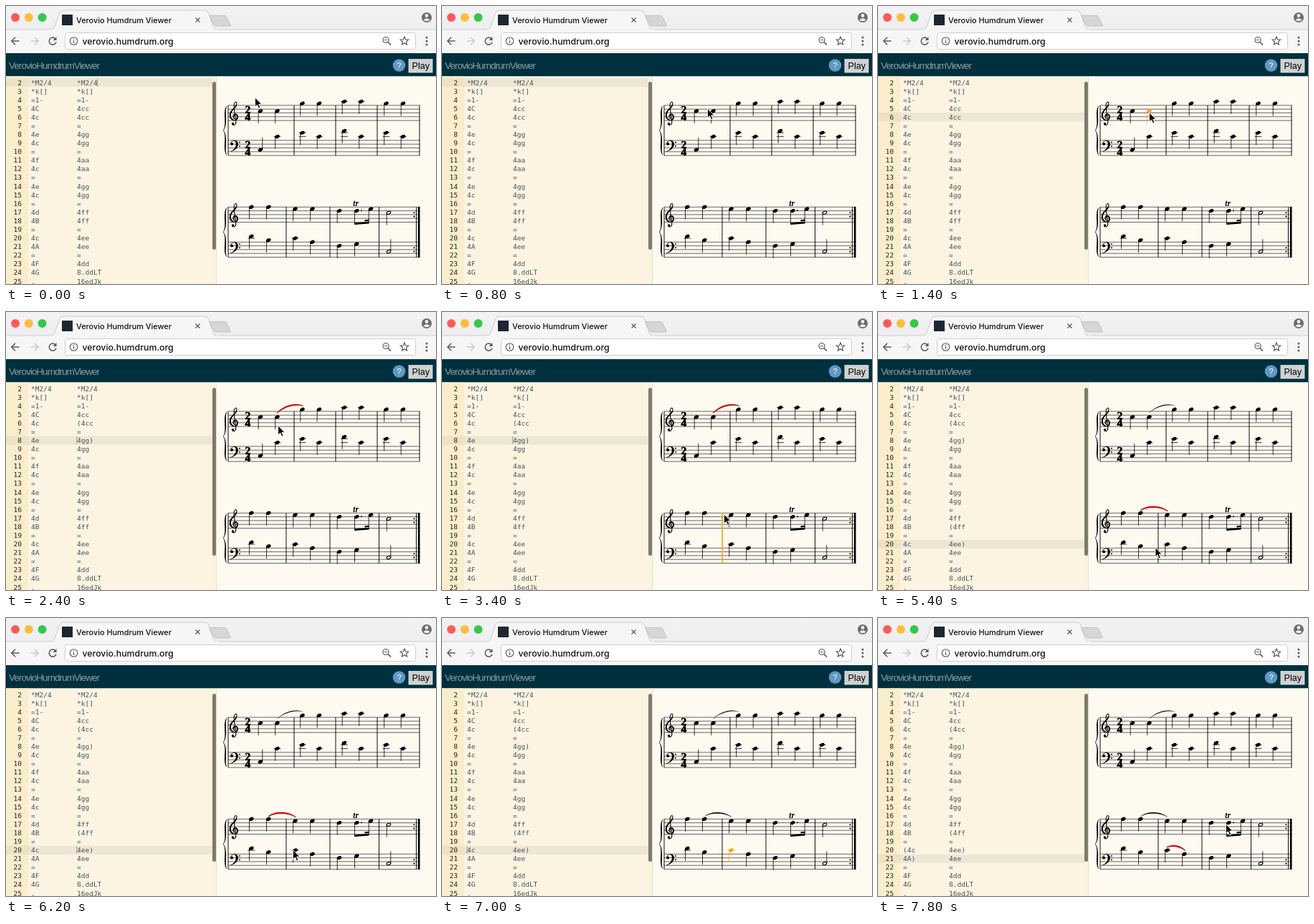
Animation, 600 px wide and 389 px high, one loop 8000 ms. Source, as an HTML page:

```html
<!DOCTYPE html>
<html lang="en">
<head>
<meta charset="utf-8">
<title>Verovio Humdrum Viewer</title>
<style>
html, body { margin: 0; width: 100%; height: 100%; overflow: hidden; background: #fffaf0; }
svg { display: block; width: 100vw; height: 100vh; }
.ui { font-family: Inter, Roboto, sans-serif; font-weight: 500; }
.arial { font-family: "Liberation Sans", Arial, sans-serif; }
.code { font: 9.5px "DejaVu Sans Mono", Menlo, monospace; white-space: pre; }
.serif { font-family: "Liberation Serif", "Times New Roman", serif; font-weight: bold; }
</style>
</head>
<body>
<svg id="stage" viewBox="0 0 600 389">
  <defs>
    <linearGradient id="strip" x2="0" y2="1"><stop stop-color="#f2f1f3"/><stop offset="1" stop-color="#eeedef"/></linearGradient>
  </defs>
  <g id="browser">
    <rect width="600" height="34" fill="url(#strip)"/>
    <rect y="33" width="600" height="34" fill="#f7f6f7"/>
    <path d="M0 33H64M296 33H600" stroke="#c4c2c5" stroke-width=".8"/>
    <path d="M62 33.5C67 33 67.500 30 69 26L74.500 10Q76 6 80 6H277Q281 6 282.500 10L288 26C289.500 30 290 33 295 33.500Z" fill="#f7f6f7" stroke="#c0bec1" stroke-width=".8"/>
    <path d="M62 33H295V36H62Z" fill="#f7f6f7"/>
    <path d="M285 13.500H305Q307 13.500 308 16L313 26Q314 28 311 28H293Q291 28 290 26L284.500 15.500Q284 13.500 285 13.500Z" fill="#d6d5d7" stroke="#b8b6b9" stroke-width=".8"/>
    <circle cx="13" cy="16" r="6" fill="#fc5b57"/>
    <circle cx="31.800" cy="16" r="6" fill="#fdbd3e"/>
    <circle cx="50.500" cy="16" r="6" fill="#34c84a"/>
    <rect x="78" y="12" width="15" height="15" fill="#1d2733"/>
    <text class="ui" x="98" y="23.500" font-size="10.900" fill="#111">Verovio Humdrum Viewer</text>
    <path d="M264.500 16.500L270.500 22.500M270.500 16.500L264.500 22.500" stroke="#555" stroke-width="1.200"/>
    <g fill="#6b6a6c">
      <circle cx="587" cy="16" r="7"/>
      <circle cx="587" cy="13.500" r="2.400" fill="#f0eff1"/>
      <path d="M582.300 19.500Q587 15.200 591.700 19.500Q587 23 582.300 19.500Z" fill="#f0eff1"/>
    </g>
    <g fill="none" stroke="#5a5a5c" stroke-width="1.600">
      <path d="M18.500 49H8M13 43.800L7.800 49L13 54.200"/>
      <path d="M34.500 49H45M40 43.800L45.200 49L40 54.200" stroke="#cbcacc"/>
      <path d="M69.300 46.200A5 5 0 1 0 70 50.500"/>
      <path d="M70.500 43V48H65.500Z" fill="#5a5a5c" stroke="none"/>
    </g>
    <rect x="82.500" y="37.500" width="489" height="23" rx="3" fill="#fff" stroke="#cfced0"/>
    <circle cx="94.500" cy="49" r="5.300" fill="none" stroke="#555" stroke-width="1.100"/>
    <path d="M94.500 48V52M94.500 45.500V46.800" stroke="#555" stroke-width="1.200"/>
    <text class="ui" x="106.500" y="53.500" font-size="12.350" fill="#111">verovio.humdrum.org</text>
    <g fill="none" stroke="#555" stroke-width="1.200">
      <circle cx="530" cy="47.500" r="4"/>
      <path d="M533 50.500L537 54.500" stroke-width="1.700"/>
      <path d="M528 47.500H532" stroke-width=".9"/>
      <path id="star"/>
    </g>
    <g fill="#5a5a5c"><circle cx="587" cy="44" r="1.500"/><circle cx="587" cy="49" r="1.500"/><circle cx="587" cy="54" r="1.500"/></g>
  </g>
  <g id="header">
    <rect y="66" width="600" height="32.500" fill="#00303e"/>
    <text class="arial" x="4" y="88" font-size="13.500" letter-spacing="-.96" fill="#8b9ca2">VerovioHumdrumViewer</text>
    <circle cx="548.500" cy="83" r="8.800" fill="#6098c6"/>
    <text class="arial" x="548.500" y="87" font-size="11.500" text-anchor="middle" fill="#fff">?</text>
    <rect x="562" y="74.500" width="33" height="18.500" fill="#d0d0d0" stroke="#e6e6e6" stroke-width=".8"/>
    <text class="arial" x="566.500" y="88" font-size="12.600" fill="#000">Play</text>
  </g>
  <rect y="98.500" width="294" height="291" fill="#fdf3e1"/>
  <rect y="98.500" width="31" height="291" fill="#faedcc"/>
  <g id="line"><rect y="-6" width="288" height="12.100" fill="#eee6d4"/><rect y="-6" width="31" height="12.100" fill="#ede3c3"/></g>
  <g id="rows" class="code"></g>
  <rect id="caret" width=".6" height="11" fill="#666"/>
  <rect x="293" y="98.500" width="307" height="291" fill="#fffaf0"/>
  <path d="M293.500 98.500V389" stroke="#ddd6c8" stroke-width=".8"/>
  <rect x="288" y="106" width="5" height="235" rx="2.500" fill="#807a6c"/>
  <g id="score"></g>
  <path id="mouse" d="M0 0V13L3 10.300L5.200 15.300L7.400 14.300L5.200 9.500H9.300Z" fill="#000" stroke="#fff" stroke-width=".9" stroke-linejoin="round"/>
</svg>
<script>
const $ = id => document.getElementById(id);
const score = $('score');
const SP = 5.3, GAP = 49, ORANGE = '#f9a51b', RED = '#d40f14', LOOP = 8000, STEP = 200;

function add(parent, tag, attrs, text) {
  const el = document.createElementNS('http://www.w3.org/2000/svg', tag);
  for (const k in attrs) el.setAttribute(k, attrs[k]);
  if (text !== undefined) el.textContent = text;
  parent.appendChild(el);
  return el;
}
const rule = (d, width, parent = score) =>
  add(parent, 'path', { d, fill: 'none', stroke: 'currentColor', 'stroke-width': width });
const shape = (d, parent = score) => add(parent, 'path', { d, fill: 'currentColor' });
const dot = (cx, cy, r) => add(score, 'circle', { cx, cy, r, fill: 'currentColor' });
const show = (el, on) => el.setAttribute('visibility', on ? 'visible' : 'hidden');

// Toolbar star
$('star').setAttribute('d', 'M' + Array.from({ length: 10 }, (_, i) => {
  const r = i % 2 ? 2.7 : 6, a = i * Math.PI / 5;
  return [556 + r * Math.sin(a), 49 - r * Math.cos(a)].map(v => v.toFixed(1));
}).join('L') + 'Z');

// Editor
const source = `*M2/4 *M2/4|*k[] *k[]|=1- =1-|4C 4cc|4c 4cc|= =|4e 4gg|4c 4gg|= =|4f 4aa|4c 4aa|= =
4e 4gg|4c 4gg|= =|4d 4ff|4B 4ff|= =|4c 4ee|4A 4ee|= =|4F 4dd|4G 8.ddLT|. 16edJk`
  .split(/[|\n]/).map(row => row.split(' '));
const rowY = n => 107 + 12.09 * (n - 2);
const cells = source.map((row, i) => {
  const y = rowY(i + 2) + 3.5;
  add($('rows'), 'text', { x: 22, y, 'text-anchor': 'end', fill: '#222' }, i + 2);
  return [35, 99].map((x, c) => add($('rows'), 'text', { x, y, fill: '#44555b' }, row[c]));
});

// Score: step counts half spaces below the top staff line
function note(x, top, step, up, half, len = 17.3) {
  const y = top + step * SP / 2, g = add(score, 'g', {});
  for (let s = -2; s >= step; s -= 2) rule(`M${x - 4.9} ${top + s * SP / 2}h9.800`, .8, g);
  add(g, 'ellipse', {
    cx: x, cy: y, rx: half ? 2.9 : 3.4, ry: half ? 1.9 : 2.4, transform: `rotate(-24 ${x} ${y})`,
    fill: half ? 'none' : 'currentColor', stroke: half ? 'currentColor' : 'none', 'stroke-width': 1.1
  });
  const sx = x + (up ? 2.8 : -2.8);
  rule(`M${sx} ${y}v${up ? -len : len}`, .8, g);
  return g;
}

function system(top, bars) {
  const low = top + GAP, end = low + 4 * SP;
  for (const y of [top, low])
    for (let i = 0; i < 5; i++) rule(`M310 ${y + i * SP}H577.500`, .6);
  const lines = [310, ...bars].map(x => rule(`M${x} ${top}V${end}`, .95));
  const h = end - top;
  const brace = shape(`M308.500 0C301 7 309 26 303 ${h / 2}C309 ${h - 26} 301 ${h - 7} 308.500 ${h}
    C304 ${h - 9} 310.800 ${h - 24} 303.700 ${h / 2}C310.800 24 304 9 308.500 0Z`);
  brace.setAttribute('transform', `translate(0 ${top})`);

  const treble = add(score, 'g', { transform: `translate(318.700 ${top + 3 * SP})` });
  rule(`M.8 2.800C-2.600 2 -2.600 -3.200 1 -3.600C5.500 -4 6.200 4.400 .6 4.900C-7.500 5 -8 -4 -3.400 -9
    C0 -12.500 3.600 -14.500 3.200 -18.500C2.800 -22 .6 -21 -.4 -17.500C-1.200 -14 .6 -5 2 6C2.800 11.300 -1 13 -3 10.800`, 1.1, treble);
  rule('M-1.500 4.300C-7 2.500 -6.800 -4.500 -3 -9C-.8 -11.300 2 -13.500 2.800 -16.500', 1.6, treble);
  rule('M-.8 -.8C-.6 -2.800 .6 -3.600 2 -3.200C5 -2.200 4.600 2.500 2.500 4', 1.5, treble);
  add(treble, 'circle', { cx: -2.2, cy: 9.8, r: 1.7, fill: 'currentColor' });

  const bass = add(score, 'g', { transform: `translate(319.300 ${low + SP})` });
  shape(`M-6.200 0C-5.800 -3.500 -3 -5.300 -.5 -5.300C3 -5.300 4.600 -2.800 4.600 0C4.600 5.500 0 8.800 -6.300 10.800
    L-6.500 10.300C-1.500 8 1.500 5 1.500 0C1.500 -2.800 .5 -4.500 -1.200 -4.500C-3 -4.500 -4.800 -3 -5 -1.500Z`, bass);
  for (const [cx, cy, r] of [[-4.2, -.2, 2], [6.7, -2.6, 1], [6.7, 2.6, 1]])
    add(bass, 'circle', { cx, cy, r, fill: 'currentColor' });
  return lines;
}

const TOP = 139, TOP2 = 281.3, LOW = TOP + GAP, LOW2 = TOP2 + GAP;
score.setAttribute('color', '#000');
system(TOP, [402, 460, 518, 577]);
const bar = system(TOP2, [391, 452, 520.5, 572.5])[1];

for (const y of [TOP, LOW])
  [2, 4].forEach((n, i) => add(score, 'text', {
    class: 'serif', x: 337.3, y: y + (i + 1) * 2 * SP, 'font-size': 15.5, 'text-anchor': 'middle',
    stroke: '#000', 'stroke-width': .6
  }, n));

const xs = [355, 378.5, 413.5, 437, 472, 495.500, 530.500, 554];
const upper = [3, 3, -1, -1, -2, -2, -1, -1].map((s, i) => note(xs[i], TOP, s));
[5, -2, -4, -2, -5, -2, -4, -2].forEach((s, i) => note(xs[i], LOW, s, i === 0));

const xs2 = [342.3, 366.3, 403.5, 427.5, 465, 489.3];
const upper2 = [0, 0, 1, 1, 2].map((s, i) => note(xs2[i], TOP2, s));
const lower2 = [-3, -1, -2, 0, 2, 1].map((s, i) => note(xs2[i], LOW2, s));
note(534, TOP2, 3, false, true);
note(534, LOW2, 5, true, true);

// Beamed trill figure
note(489.3, TOP2, 2, false, false, 18.5);
note(509, TOP2, 1, false, false, 19.5);
dot(496, 286.3, 1);
shape('M486.200 303.600L506.500 302V304.400L486.200 306ZM500.500 299.200L506.500 298.700V301L500.500 301.500Z');
add(score, 'text', { class: 'serif', x: 484.3, y: 279.6, 'font-size': 11.5, 'font-style': 'italic' }, 'tr');

// Closing repeat
shape(`M574.800 ${TOP2 - .3}h2.700V${LOW2 + 4 * SP + .3}h-2.700Z`);
for (const y of [TOP2, LOW2]) for (const k of [1.5, 2.5]) dot(569.5, y + k * SP, 1.1);

const slurs = [
  'M378.500 141C387 132 402 126.500 414 131C402 128.300 388 132.800 378.500 141Z',
  'M366.500 277.500C375 270.500 393 269.800 404 278.500C393 271.600 375 272.300 366.500 277.500Z',
  'M403 320.500C411 316.500 421 318 428.500 325C420.500 319.500 411 318.300 403 320.500Z'
].map(d => add(score, 'path', { d, 'stroke-linejoin': 'round' }));

// start, active row, caret x (0 = none), slurs drawn, selected item
const states = [
  [0, 2, 127, 0, null],
  [1400, 6, 0, 0, upper[1]],
  [2000, 8, 98.6, 1, slurs[0]],
  [4400, 18, 0, 1, upper2[1]],
  [4800, 20, 98.6, 2, slurs[1]],
  [6400, 20, 0, 2, lower2[2]],
  [7000, 20, 34.6, 2, lower2[2]],
  [7200, 21, 34.6, 3, slurs[2]]
];
// slur edits: opening row, column, closing row
const edits = [[6, 1, 8], [18, 1, 20], [20, 0, 21]];
// time, x, y of the pointer
const path = [
  [0, 347.5, 128], [1200, 378.5, 149], [2200, 378.5, 149], [3400, 393.5, 283],
  [4200, 367, 282], [4800, 367, 282], [5400, 387, 329.5],
  [6400, 402, 324], [7200, 402, 324], [7800, 485.5, 288.5]
];
const picks = [upper[1], upper2[1], lower2[2]];

function pointer(t) {
  const i = path.findIndex(p => p[0] > t);
  if (i < 0) return path[path.length - 1].slice(1);
  const [a, b] = [path[i - 1], path[i]];
  const u = (t - a[0]) / (b[0] - a[0]), e = u * u * (3 - 2 * u);
  return [1, 2].map(k => a[k] + (b[k] - a[k]) * e);
}

function draw(now) {
  const t = Math.floor(now % LOOP / STEP) * STEP;
  const [start, row, caret, count, selected] = states.filter(s => s[0] <= t).pop();

  $('line').setAttribute('transform', `translate(0 ${rowY(row)})`);
  $('caret').setAttribute('x', caret);
  $('caret').setAttribute('y', rowY(row) - 5.5);
  show($('caret'), caret && (t - start) % 1000 < 500);

  edits.forEach(([open, col, close], i) => {
    const on = i < count, a = source[open - 2][col], b = source[close - 2][col];
    cells[open - 2][col].textContent = (on ? '(' : '') + a;
    cells[close - 2][col].textContent = b + (on ? ')' : '');
  });

  slurs.forEach((s, i) => {
    const color = s === selected ? RED : '#000';
    show(s, i < count);
    s.setAttribute('fill', color);
    s.setAttribute('stroke', color);
    s.setAttribute('stroke-width', s === selected ? 1.3 : .2);
  });
  for (const n of picks) n.setAttribute('color', n === selected ? ORANGE : '#000');
  const hover = t === 3400;
  bar.setAttribute('color', hover ? ORANGE : '#000');
  bar.setAttribute('stroke-width', hover ? 1.7 : .95);

  const [x, y] = pointer(t);
  $('mouse').setAttribute('transform', `translate(${x} ${y})`);
  show($('mouse'), t < 7000 || t >= 7400);
}

function tick() {
  draw(performance.now());
  requestAnimationFrame(tick);
}
tick();
</script>
</body>
</html>
```
